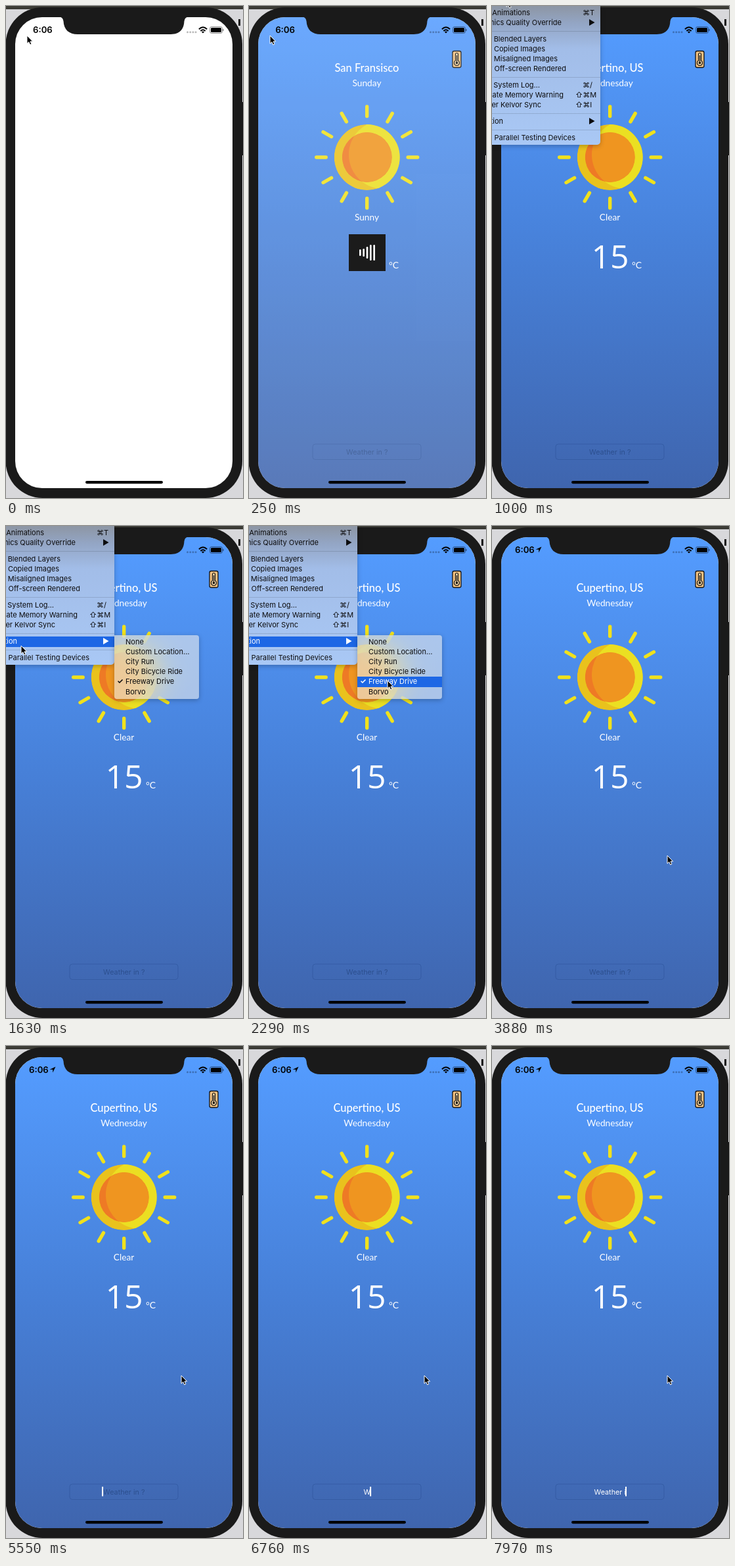
Animation, 361 px wide and 748 px high, one loop 8 s. Source, as an HTML page:

```html
<!DOCTYPE html>
<html lang="en">
<head>
<meta charset="utf-8">
<title>Weather</title>
<style>
  html, body { margin: 0; width: 100%; height: 100%; overflow: hidden; background: #d8d8db; }
  svg { position: absolute; left: 0; top: 0; display: block; }
  .lato { font-family: Lato, sans-serif; fill: #fff; text-anchor: middle; }
  .ui { font-family: Inter, sans-serif; }
  .panel {
    position: absolute; overflow: hidden;
    box-shadow: 0 2px 7px rgba(0, 0, 0, .25);
    font: 11px/15.2px Inter, "DejaVu Sans", sans-serif;
    color: #0c0c0e; white-space: pre;
  }
  #menu {
    left: 0; top: 0; width: 165px; height: 211px; border-radius: 0 0 5px 0;
    background: linear-gradient(#8d96a4, #93a5c4 26px, #a2bde8 65px, #a9c8f5);
  }
  #submenu {
    left: 165px; top: 166px; width: 129px; height: 97px; border-radius: 0 4px 4px 4px;
    background: rgba(236, 236, 236, .6);
    backdrop-filter: blur(18px);
  }
  .row { position: absolute; left: 0; width: 100%; height: 15.2px; }
  .row.on { background: #1d67e5; color: #fff; }
  .row span { position: absolute; top: 0; }
  .line { position: absolute; left: 0; width: 100%; height: 1px; background: rgba(0, 0, 0, .13); }
</style>
</head>
<body>
<svg width="361" height="748" viewBox="0 0 361 748">
  <defs>
    <linearGradient id="sky" x1="0" y1="0" x2="0" y2="1">
      <stop offset="0" stop-color="#549cff"/>
      <stop offset=".5" stop-color="#4780d8"/>
      <stop offset="1" stop-color="#3f65ae"/>
    </linearGradient>
    <clipPath id="outerDisc"><circle cx="179.7" cy="230" r="50"/></clipPath>
    <clipPath id="innerDisc"><circle cx="179.7" cy="230" r="38"/></clipPath>
  </defs>

  <rect width="361" height="5" fill="#3c3c36"/>
  <rect x="354" y="20" width="3" height="10" fill="#111"/>
  <rect x="359" y="146" width="2" height="81" fill="#111"/>
  <rect x="-.5" y="2" width="360.5" height="746" rx="56" fill="#1a1a1a"/>
  <rect x="14" y="17" width="331" height="716" rx="41" fill="#fff"/>

  <g id="app">
    <rect x="14" y="17" width="331" height="716" rx="41" fill="url(#sky)"/>
    <text class="lato" id="city" x="179.5" y="100" font-size="16.5" font-weight="500"></text>
    <text class="lato" id="day" x="179.5" y="121.5" font-size="13.7"></text>
    <g id="rays" stroke="#f0e11c" stroke-width="5.4" stroke-linecap="round"></g>
    <g clip-path="url(#outerDisc)">
      <circle cx="179.7" cy="230" r="50" fill="#e9c21d"/>
      <circle cx="204" cy="226" r="52" fill="#ebdf22"/>
    </g>
    <g clip-path="url(#innerDisc)">
      <circle cx="179.7" cy="230" r="38" fill="#ee7a25"/>
      <circle cx="204" cy="226" r="52" fill="#ef9520"/>
    </g>
    <text class="lato" id="sky-state" x="179.5" y="325.5" font-size="13.7"></text>
    <text id="degrees" x="180" y="399" font-family="Open Sans, sans-serif" font-size="50"
      text-anchor="middle" fill="#fff">15</text>
    <text class="lato" x="220.5" y="398.5" font-size="14">°C</text>

    <rect x="310" y="68.5" width="13" height="25" rx="2.5" fill="#f2c180" stroke="#111" stroke-width="1.3"/>
    <path d="M314.5 83V73.5a2 2 0 0 1 4 0V83a4 4 0 1 1-4 0Z" fill="#f7d9a8" stroke="#111" stroke-width="1.2"/>
    <path d="M316.5 75V86" stroke="#111" stroke-width="1.2"/>
    <circle cx="316.5" cy="86.5" r="1.8" fill="#111"/>

    <rect x="97" y="666" width="165" height="23.5" rx="4" fill="none" stroke="#1d3f80" stroke-opacity=".3"/>
    <text class="ui" id="field" x="179.8" y="681.5" font-size="10.8" text-anchor="middle" xml:space="preserve"></text>
    <rect id="caret" y="670" width="2" height="14.5" fill="#fff"/>
  </g>

  <g id="loader">
    <rect x="152" y="347" width="56" height="56" fill="#1b1b1b"/>
    <g id="bars" fill="#fff"></g>
  </g>

  <path d="M80 16Q87 17 87.5 23C88 36 96 43 109 43H251C264 43 271 36 271.5 23Q272 17 279 16Z" fill="#1a1a1a"/>
  <text class="ui" id="clock" y="41.3" font-size="13.2" font-weight="600">6:06</text>
  <path id="arrow" d="M75.5 31.5L66.5 35.8H71.2V40.5Z"/>
  <g fill-opacity=".27">
    <circle cx="276.5" cy="39.8" r="1.5"/><circle cx="280.7" cy="39.8" r="1.5"/>
    <circle cx="284.9" cy="39.8" r="1.5"/><circle cx="289" cy="39.8" r="1.5"/>
  </g>
  <path d="M293.9 35.2Q300 29.4 306.1 35.2M296.4 38Q300 34.6 303.6 38" fill="none" stroke="#000" stroke-width="2"/>
  <path d="M297.9 39.3Q300 37.7 302.1 39.3L300 41.6Z"/>
  <rect x="310.5" y="31.5" width="19" height="10" rx="2.8" fill="none" stroke="#000" stroke-opacity=".45"/>
  <rect x="312" y="33" width="16" height="7" rx="1.5"/>
  <rect x="330.2" y="34.8" width="1.3" height="3.4" rx=".6" fill-opacity=".5"/>
  <rect x="121" y="722" width="118" height="4.2" rx="2.1"/>
</svg>

<div class="panel" id="menu"></div>
<div class="panel" id="submenu"></div>

<svg width="361" height="748" viewBox="0 0 361 748">
  <path id="pointer" d="M0 0V12.2L2.8 9.7L4.7 14L6.9 13L5 8.9H8.7Z" stroke="#fff" stroke-width="1" stroke-linejoin="round"/>
</svg>

<script>
const LOOP = 8000;
const $ = id => document.getElementById(id);
const clamp = x => Math.min(1, Math.max(0, x));
const progress = (t, from, to) => clamp((t - from) / (to - from));
const ease = p => p * p * (3 - 2 * p);

// Label, row centre, right edge of the label, shortcut, left edge of the shortcut
const MENU = [
  ["Slow Animations", 11, 58, "⌘T", 138],
  ["Graphics Quality Override", 26, 106, "▶", 147],
  ["Color Blended Layers", 50.5, 83],
  ["Color Copied Images", 65.5, 81],
  ["Color Misaligned Images", 81, 100],
  ["Color Off-screen Rendered", 96, 113],
  ["Open System Log…", 121, 73, "⌘/", 138],
  ["Simulate Memory Warning", 136, 109, "⇧⌘M", 127],
  ["Trigger Kelvor Sync", 151, 75, "⇧⌘I", 127],
  ["Location", 176, 17, "▶", 147],
  ["Show Parallel Testing Devices", 201, 127]
];
const LOCATION = 9;
const PLACES = ["None", "Custom Location…", "City Run", "City Bicycle Ride", "Freeway Drive", "Borvo"];
const CHOSEN = 4;

function addRow(panel, centre) {
  const row = document.createElement("div");
  row.className = "row";
  row.style.top = centre - 7.6 + "px";
  panel.append(row);
  return row;
}

function addLabel(row, text, side, offset) {
  const label = document.createElement("span");
  label.textContent = text;
  label.style[side] = offset + "px";
  row.append(label);
  return label;
}

const menuRows = MENU.map(([text, centre, end, shortcut, start]) => {
  const row = addRow($("menu"), centre);
  addLabel(row, text, "right", 165 - end);
  if (shortcut) addLabel(row, shortcut, "left", start);
  return row;
});
for (const y of [38, 108, 163, 188]) {
  const line = document.createElement("div");
  line.className = "line";
  line.style.top = y + "px";
  $("menu").append(line);
}
const placeRows = PLACES.map((text, i) => {
  const row = addRow($("submenu"), 10.2 + i * 15.2);
  addLabel(row, text, "left", 17);
  if (i === CHOSEN) addLabel(row, "✓", "left", 4).style.fontWeight = "bold";
  return row;
});

function addShape(parent, name, attributes) {
  const shape = document.createElementNS("http://www.w3.org/2000/svg", name);
  for (const key in attributes) shape.setAttribute(key, attributes[key]);
  return parent.appendChild(shape);
}

for (let i = 0; i < 12; i++) {
  addShape($("rays"), "path", { d: "M179.7 153V167.5", transform: `rotate(${i * 30} 179.7 230)` });
}
const bars = Array.from({ length: 5 }, (_, i) =>
  addShape($("bars"), "rect", { x: 168 + i * 24 / 4.5, width: 24 / 9, rx: 1.3 }));

// Pointer stops: time, x, y
const STOPS = [
  [0, 32, 45], [450, 32, 45], [720, 22, -18], [950, 22, -18], [1400, 23, 182],
  [1750, 23, 182], [2000, 178, 181], [2230, 211, 235], [2850, 211, 235], [3500, 267, 501], [LOOP, 267, 501]
];

function pointerAt(t) {
  const next = STOPS.findIndex(stop => stop[0] > t);
  const [t0, x0, y0] = STOPS[next - 1], [t1, x1, y1] = STOPS[next];
  const p = ease(progress(t, t0, t1));
  return [x0 + (x1 - x0) * p, y0 + (y1 - y0) * p];
}

function drawMenus(t, x, y) {
  const opacity = t < 880 ? 0 : 1 - progress(t, 2600, 2760);
  const subOpen = t >= 1400;
  const inSub = subOpen && x >= 165;
  for (const [id, shown] of [["menu", opacity > 0], ["submenu", opacity > 0 && subOpen]]) {
    $(id).style.display = shown ? "block" : "none";
    $(id).style.opacity = opacity;
  }
  menuRows.forEach((row, i) => {
    const hovered = Math.abs(y - MENU[i][1]) < 7.6;
    row.classList.toggle("on", subOpen ? i === LOCATION : hovered);
  });
  const blink = t > 2500 && t < 2560;
  placeRows.forEach((row, i) =>
    row.classList.toggle("on", inSub && !blink && Math.floor((y - 168.6) / 15.2) === i));
}

function drawWeather(t) {
  const loaded = t >= 760;
  $("city").textContent = loaded ? "Cupertino, US" : "San Fransisco";
  $("day").textContent = loaded ? "Wednesday" : "Sunday";
  $("sky-state").textContent = loaded ? "Clear" : "Sunny";
  $("degrees").style.display = loaded ? "" : "none";
  $("loader").style.display = loaded || t < 60 ? "none" : "";
  bars.forEach((bar, i) => {
    const phase = (t / 1000 - i / 10 + 1) % 1;
    const p = 1 - (1 - phase * 2 % 1) ** 5;
    const height = 24 * (phase < .5 ? 1 - .6 * p : .4 + .6 * p);
    bar.setAttribute("y", 375 - height / 2);
    bar.setAttribute("height", height);
  });
}

function drawField(t) {
  const count = t < 6760 ? 0 : Math.min(9, 1 + Math.floor((t - 6760) / 135));
  const field = $("field");
  field.textContent = count ? "Weather i".slice(0, count) : "Weather in ?";
  field.setAttribute("fill", count ? "#fff" : "#2c4f8e");
  const half = field.getComputedTextLength() / 2;
  $("caret").setAttribute("x", 179.8 + (count ? half - 1 : -half - 2));
  const blink = t % 1000;
  const fade = 1 - progress(blink, 600, 700) + progress(blink, 900, 1000);
  $("caret").style.opacity = t < 5000 ? 0 : count ? 1 : fade;
}

function draw(t) {
  $("app").style.opacity = progress(t, 40, 285);
  const shift = ease(progress(t, 180, 480));
  $("clock").setAttribute("x", 41 - 6 * shift);
  $("arrow").style.opacity = progress(t, 320, 480);
  drawWeather(t);
  drawField(t);
  const [x, y] = pointerAt(t);
  $("pointer").setAttribute("transform", `translate(${x} ${y})`);
  drawMenus(t, x, y);
}

const start = performance.now();
function tick() {
  draw((performance.now() - start) % LOOP);
  requestAnimationFrame(tick);
}
tick();
</script>
</body>
</html>
```
